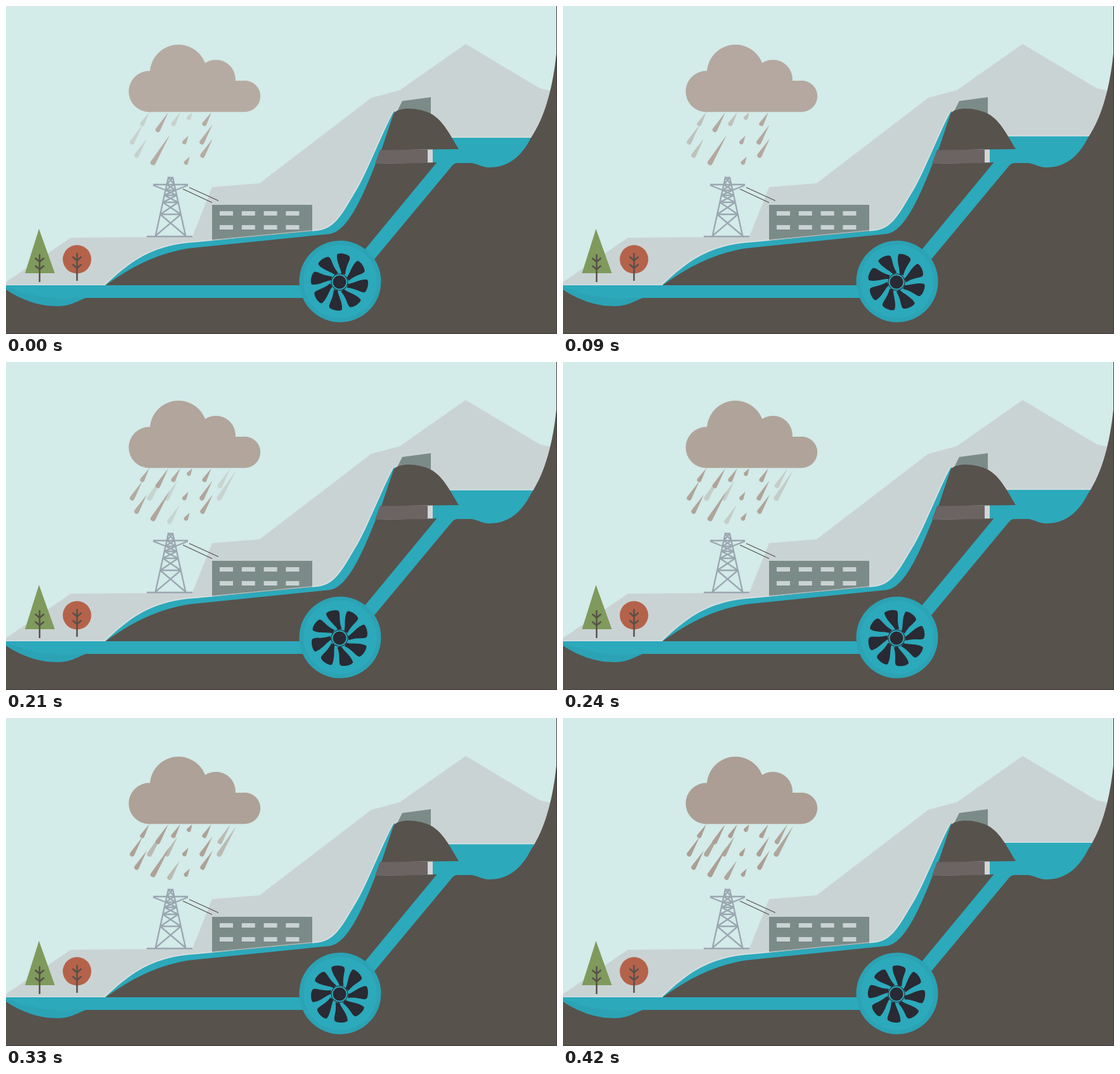
Recreate the animation shown at these times as an HTML page. Size 869x518 px, loop 0.45 s.

```html
<!DOCTYPE html>
<html lang="en">
<head>
<meta charset="utf-8">
<title>Hydropower</title>
<style>
  html, body { margin: 0; width: 100%; height: 100%; overflow: hidden; background: #d3ebe9; }
  svg { display: block; }
  .earth { fill: #57524c; }
  .water { fill: #2ca9bb; }
  .deep { fill: #2ba3b5; }
  .pale { fill: #cad3d4; }
  .brick { fill: #7b8b88; }
  .line { fill: none; stroke: #57504a; stroke-width: 2.5; }
  .steel { fill: none; stroke: #9ba7b0; stroke-width: 2.4; }
  .foam { fill: none; stroke: #e6f3f3; opacity: .65; }
</style>
</head>
<body>
<svg width="869" height="518" viewBox="0 0 869 518">
  <rect width="869" height="518" fill="#d3ebe9"/>
  <path class="pale" d="M0 436 102 366 294 364 325 286 400 280 576 145 621 133 725 60 842 130 869 136V441H0Z"/>

  <g id="weather">
    <circle cx="226" cy="135" r="32.500"/>
    <circle cx="272" cy="106" r="45"/>
    <circle cx="331" cy="116" r="31"/>
    <circle cx="376.500" cy="142.500" r="24.700"/>
    <rect x="226" y="118" width="151" height="49.300"/>
    <g id="fading"></g>
    <g id="steady"></g>
    <g id="late"></g>
  </g>

  <path id="pylon" class="steel"/>
  <path class="line" style="stroke-width:1.300" d="M279 289 325 310.500M289 286.500 335 307.500"/>

  <path class="brick" d="M325 314H483V358L325 370Z"/>
  <g id="windows" class="pale"></g>

  <path class="brick" d="M625 150 670 144V172H614Z"/>
  <path id="lake" class="water"/>
  <path id="shore" class="foam"/>

  <path class="foam" d="M156 439C189 409 224 376 299 372L489 354C519 352 531 324 554 286C574 249 595 194 611 165"/>
  <path class="water" d="M157 440.500C190 410 225 377 300 373L490 355C520 353 532 325 555 287C575 250 596 195 612 166L620 175 592 260 530 365 290 390 165 445Z"/>
  <path class="earth" d="M0 441H157C195 414 235 391 290 382.500L510 360C540 357 565 294 583 249L680 247 735 248C748 251 752 255 762 255C790 255 812 240 828 208C851 174 863 125 868 75H869V518H0Z"/>
  <path fill="#6b6463" d="M590 227H665V248L582 249Z"/>
  <path fill="#d3d6d6" d="M665 227H673V247H665Z"/>
  <path class="earth" d="M592 227.500 611 171Q614 163 634 162Q655 162 671 170.500C691 182 702 207 714 226Z"/>

  <path class="deep" d="M0 441H157L126 461C112 466 103 474 80 474C50 474 23 463 0 448Z"/>
  <path class="water" d="M0 441H480V461H112C80 464 35 459 0 443Z"/>
  <path class="foam" d="M0 440.500H157"/>
  <path class="water" d="M679.500 247 690 240H720L735 248H712Q707 248 703 253L575 407 561.500 390Z"/>
  <circle class="deep" cx="527" cy="435" r="64.500"/>
  <circle class="water" cx="527" cy="435" r="58"/>
  <g transform="translate(526 436)">
    <g id="fan" fill="#292a33"></g>
    <circle r="13.500" fill="#292a33"/>
    <circle r="11.500" fill="none" stroke="#2ca9bb" stroke-width="2"/>
  </g>

  <path fill="#7f9a5c" d="M52 352 77 422H30Z"/>
  <circle cx="112" cy="400" r="22.500" fill="#b5624a"/>
  <path id="trunks" class="line"/>
  <path fill="none" stroke="#403d3a" d="M868.500 0V517.500H0"/>
</svg>
<script>
const LOOP = 450, STEP = 30;
const el = id => document.getElementById(id);
const repeat = (n, make) => Array.from({ length: n }, (_, i) => make(i)).join('');

// Slanted teardrop: a sharp tip above, a round head at (x, y).
function drop(x, y, length) {
  const r = 3.2 + length / 60;
  return `<path transform="translate(${x} ${y}) rotate(31)"
    d="M0 ${-length}L${r} 0A${r} ${r} 0 0 1 ${-r} 0Z"/>`;
}

// Each letter is one drop: fading in, steady or late. Lengths follow a wave along the row.
const kinds = { f: 'fading', s: 'steady', l: 'late' };
function rainRow(pattern, x, gap, mean, swing, headY) {
  [...pattern].forEach((kind, i) => {
    const length = mean + swing * Math.cos((i - 1) * Math.PI / 2);
    el(kinds[kind]).innerHTML += drop(x + gap * i, headY(i, length), length);
  });
}
rainRow('fsffsl', 215, 24.5, 21, 11, (i, length) => 168 + .86 * length);
rainRow('fllssl', 199, 27.5, 32, 20, () => 215);
rainRow('fslss', 206, 26, 31, 20, i => 236 + 16 * Math.sin(i * Math.PI / 4));

const half = y => 3.5 + (y - 271) * .22;
const levels = [271, 282, 291, 299, 310, 329, 363];
let steel = 'M222 364H294M232 282H287M232 283 252 291M287 283 267 291';
levels.slice(1).forEach((low, i) => {
  const a = half(levels[i]), b = half(low), top = levels[i];
  steel += `M${259.5 - a} ${top}h${2 * a}L${259.5 + b} ${low}L${259.5 - a} ${top}L${259.5 - b} ${low}L${259.5 + a} ${top}`;
});
el('pylon').setAttribute('d', steel);

el('windows').innerHTML = repeat(8, i =>
  `<rect x="${337 + i % 4 * 34.8}" y="${i < 4 ? 324 : 346}" width="21" height="7"/>`);

const branch = (x, y) => `M${x - 7} ${y}l7 6 7 -6`;
const trunk = (x, y) => `M${x} ${y}v44` + branch(x, y + 6) + branch(x, y + 18);
el('trunks').setAttribute('d', trunk(53, 392) + trunk(112, 390));

el('fan').innerHTML = repeat(8, i => `<path transform="rotate(${i * 45})"
  d="M3 -13C2 -22 -5 -32 -4 -43C-3 -47 12 -45 16 -40C18 -35 10 -27 9 -12Z"/>`);

function draw(now) {
  const t = Math.floor(now % LOOP / STEP) * STEP;
  const p = t / 420;
  const mix = (from, to) => from + (to - from) * p;
  const level = mix(208, 197);

  el('lake').setAttribute('d', `M673 262V226H690V${level}H869V262Z`);
  el('shore').setAttribute('d', `M695 ${level - .5}H840`);
  el('fan').setAttribute('transform', `rotate(${t / LOOP * 45})`);
  el('weather').setAttribute('fill', `rgb(${mix(182, 172)},${mix(171, 158)},${mix(163, 148)})`);
  el('fading').setAttribute('opacity', Math.min(1, .4 + t / 400));
  el('late').setAttribute('opacity', Math.max(0, (t - 90) / 330 * .9));
  requestAnimationFrame(draw);
}
requestAnimationFrame(draw);
</script>
</body>
</html>
```
